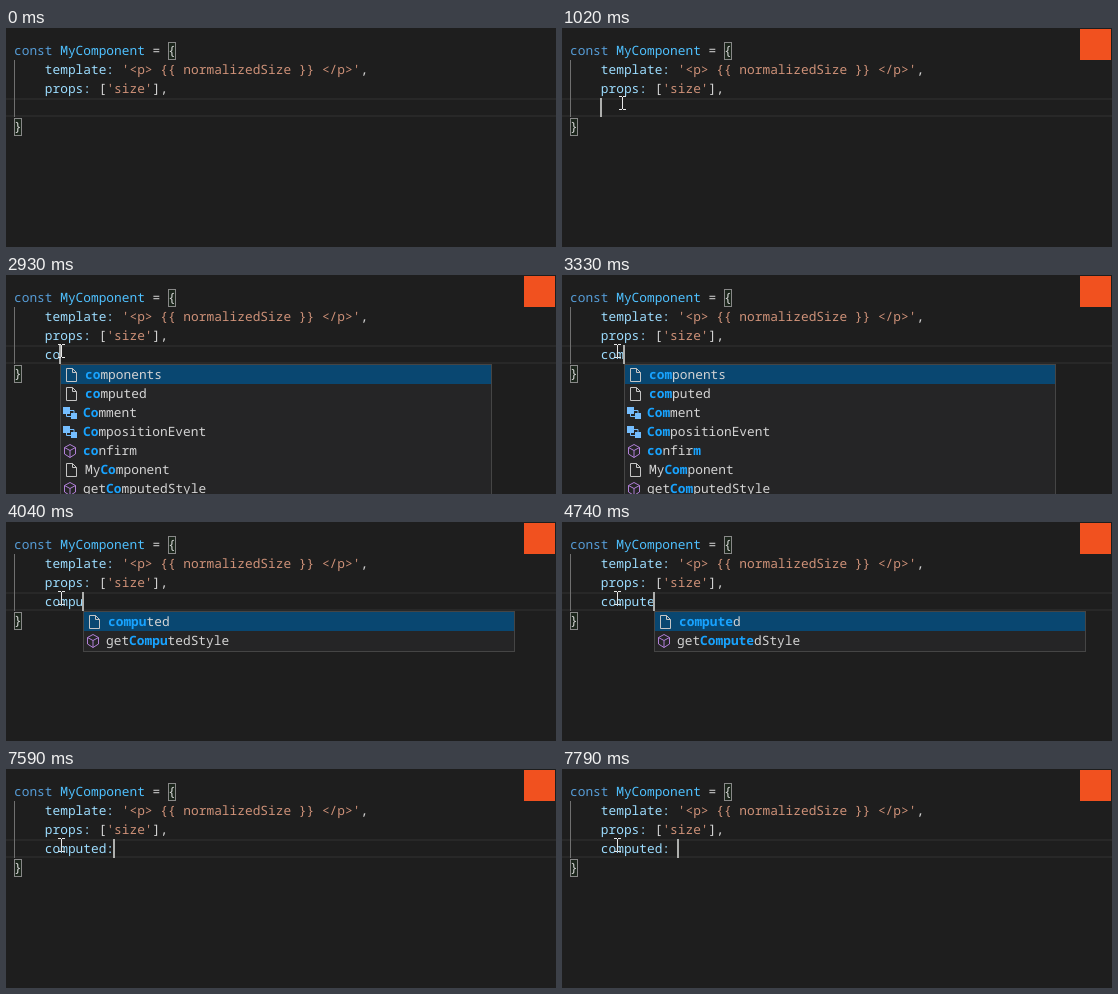
An HTML page that plays this animation: 550 by 219 pixels, repeating every 8 s.

```html
<!DOCTYPE html>
<html lang="en">
<head>
<meta charset="utf-8">
<title>Typing a computed property</title>
<style>
  html, body { margin: 0; width: 100%; height: 100%; overflow: hidden; background: #1e1e1e; }
  #stage {
    position: relative; width: 550px; height: 219px; overflow: hidden;
    background: #1e1e1e; color: #d4d4d4;
    font: 500 12.8333px/19px "Noto Sans Mono", "DejaVu Sans Mono", monospace;
    font-variant-ligatures: none; text-rendering: geometricPrecision; white-space: pre;
  }
  #stage > * { position: absolute; }
  #stage > [hidden] { display: none; }
  .line { left: 8px; height: 19px; }
  .current { left: 0; right: 0; top: 70px; height: 15px; border: solid #282828; border-width: 2px 0; }
  .guide { left: 8px; top: 32px; width: 1px; height: 57px; background: #707070; }
  .match { width: 6px; height: 16px; border: 1px solid #888; background: rgba(0, 100, 0, .1) padding-box; }
  .keyword { color: #569cd6; }
  .constant { color: #4fc1ff; }
  .key { color: #9cdcfe; }
  .string { color: #ce9178; }
  #caret { top: 70px; width: 2px; height: 19px; background: #aeafad; }
  #badge { left: 518px; top: 1px; width: 31px; height: 31px; background: #f1511f; }
  #pointer { left: 0; top: 0; width: 9px; height: 16px; }
  #popup {
    top: 89px; width: 430px; padding-bottom: 1px;
    background: #252526; border: 1px solid #454545;
  }
  .row { position: relative; height: 19px; padding-left: 22px; }
  .row.file { padding-left: 24px; }
  .row:first-child { background: #094771; }
  .row svg { position: absolute; left: 1px; top: 1.5px; width: 16px; height: 16px; }
  .row.file svg { left: 2px; }
  .row b { color: #18a3ff; }
</style>
</head>
<body>
<svg width="0" height="0" style="position:absolute">
  <symbol id="file" viewBox="0 0 16 16">
    <path d="M3.5 1.5H9.5L13.5 5.5V14.5H3.5ZM9.5 1.5V5.5H13.5" fill="none" stroke="#c5c5c5"/>
  </symbol>
  <symbol id="type" viewBox="0 0 16 16" fill="#75beff">
    <path d="M1 2H8V9H1ZM9 8H15V14H9Z"/>
    <path d="M4.5 8V11.5H10M7 5.5H12V9" fill="none" stroke="#75beff"/>
  </symbol>
  <symbol id="method" viewBox="0 0 16 16">
    <path d="M8 1.5L13.5 4.5V11L8 14.5L2.5 11V4.5ZM2.5 4.5L8 7.5L13.5 4.5M8 7.5V14.5" fill="none" stroke="#b180d7"/>
  </symbol>
</svg>
<div id="stage">
  <div class="current"></div>
  <div class="guide"></div>
  <div class="match" style="left:162px;top:14px"></div>
  <div class="match" style="left:8px;top:90px"></div>
  <div class="line" style="top:13px"><span class="keyword">const</span> <span class="constant">MyComponent</span> = {</div>
  <div class="line" style="top:32px">    <span class="key">template:</span> <span class="string">'&lt;p&gt; {{ normalizedSize }} &lt;/p&gt;'</span>,</div>
  <div class="line" style="top:51px">    <span class="key">props:</span> [<span class="string">'size'</span>],</div>
  <div class="line key" id="typed" style="top:70px"></div>
  <div class="line" style="top:89px">}</div>
  <div id="caret"></div>
  <svg id="pointer" viewBox="0 0 9 16">
    <path d="M1 1.5H4M5 1.5H8M4.5 2V14M1 14.5H4M5 14.5H8" fill="none" stroke="#e8e8e8"/>
  </svg>
  <div id="popup"></div>
  <div id="badge"></div>
</div>
<script>
const LOOP = 8000, CHAR = 7.7, INDENT = 38;
const $ = id => document.getElementById(id);

const FILES = ["components", "computed", "MyComponent"];
const METHODS = ["confirm", "getComputedStyle", "addEventListener", "alert"];

const broad = ["components", "computed", "Comment", "CompositionEvent", "confirm", "MyComponent", "getComputedStyle"];
const medium = ["components", "computed", "CompositionEvent", "MyComponent", "getComputedStyle",
  "DynamicsCompressorNode", "OfflineAudioCompletionEvent"];
const narrow = ["computed", "getComputedStyle"];
const globals = ["AbortController", "AbortSignal", "AbstractRange", "addEventListener", "alert", "AnalyserNode", "Animation"];

// [start ms, typed text, caret shown, suggestions]
const edits = [
  [0, "", false],
  [1020, "", true],
  [1520, "", false],
  [2030, "", true],
  [2430, "c", true],
  [2830, "co", true],
  [2930, "co", true, broad],
  [3330, "com", true, broad],
  [3740, "comp", true, medium],
  [4040, "compu", true, narrow],
  [4440, "comput", true, narrow],
  [4740, "compute", true, narrow],
  [5240, "computed", true, narrow],
  [5740, "computed", false, narrow],
  [6150, "computed", true],
  [6680, "computed", false],
  [7180, "computed", true],
  [7590, "computed:", true],
  [7690, "computed:", true, globals],
  [7790, "computed: ", true]
];

// [start ms, centre x, centre y]
const moves = [
  [70, 112, 205], [150, 84, 152], [240, 62, 106], [330, 53.5, 83],
  [530, 54.5, 80], [630, 54.5, 78],
  [1020, 60.5, 75], [1120, 58.5, 73], [1220, 55.5, 76]
];

const at = (steps, t) => steps.filter(s => s[0] <= t).pop();

function highlight(label, query) {
  const lower = label.toLowerCase();
  const whole = lower.indexOf(query);
  if (whole >= 0) {
    const end = whole + query.length;
    return label.slice(0, whole) + `<b>${label.slice(whole, end)}</b>` + label.slice(end);
  }
  let i = 0;
  return [...label].map((ch, n) => lower[n] === query[i] ? (i++, `<b>${ch}</b>`) : ch).join("");
}

function row(label, query) {
  const kind = FILES.includes(label) ? "file" : METHODS.includes(label) ? "method" : "type";
  return `<div class="row ${kind}"><svg><use href="#${kind}"/></svg>${highlight(label, query)}</div>`;
}

function showEdit([, text, caret, items]) {
  const x = Math.floor(INDENT + CHAR * text.length);
  $("typed").textContent = "    " + text;
  $("caret").hidden = !caret;
  $("caret").style.left = x + "px";
  $("popup").hidden = !items;
  $("popup").style.left = x + 1 + "px";
  const query = text.endsWith(":") ? "" : text;
  $("popup").innerHTML = (items || []).map(label => row(label, query)).join("");
}

function showPointer(move) {
  $("badge").style.display = $("pointer").style.display = move ? "" : "none";
  if (move) $("pointer").style.transform = `translate(${move[1] - 4.5}px, ${move[2] - 8}px)`;
}

const start = performance.now();
let edit, move = null;

function draw() {
  const t = (performance.now() - start) % LOOP;
  const nextEdit = at(edits, t), nextMove = at(moves, t);
  if (nextEdit !== edit) showEdit(edit = nextEdit);
  if (nextMove !== move) showPointer(move = nextMove);
  requestAnimationFrame(draw);
}
draw();
</script>
</body>
</html>
```
